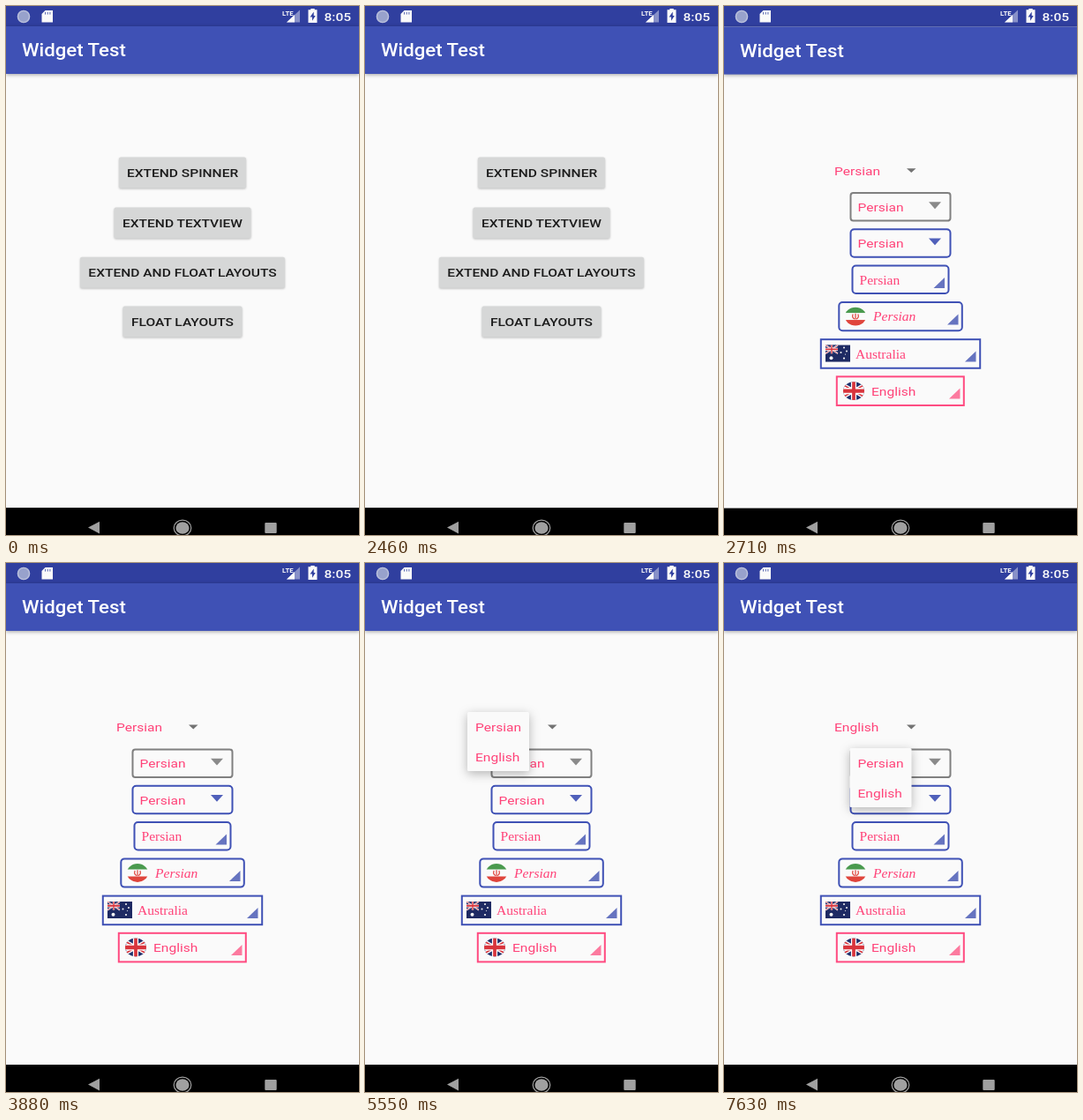
An HTML page for the animation above (8 s loop, 400 by 600 pixels).

```html
<!DOCTYPE html>
<html lang="en">
<head>
<meta charset="utf-8">
<title>Widget Test</title>
<style>
  html, body { margin: 0; width: 100%; height: 100%; overflow: hidden; background: #000; }
  svg { display: block; width: 400px; height: 600px; }
  text { font: 14px Roboto, sans-serif; fill: #ff4278; }
  .title { font: 500 20px Roboto, sans-serif; fill: #fff; }
  .label { font-weight: 500; fill: #1c1c1c; }
  .clock { font-weight: 500; fill: #fafafa; }
  .lte { font: 700 7px Roboto, sans-serif; fill: #fafafa; }
  .serif { font-family: "Liberation Serif", serif; }
  .italic { font-style: italic; }
  .mid { text-anchor: middle; }
  .button { fill: #d6d7d7; filter: drop-shadow(0 1px 1px rgba(0, 0, 0, .24)); }
  .bar { filter: drop-shadow(0 1px 2px rgba(0, 0, 0, .35)); }
  .card { fill: #fafafa; filter: drop-shadow(0 3px 6px rgba(0, 0, 0, .28)); }
</style>
</head>
<body>
<svg id="stage" viewBox="0 0 400 600"></svg>
<script>
const PAPER = '#fafafa', STATUS = '#303f9f', BLUE = '#3f51b5', GRAY = '#808080',
  PINK = '#ff4a80', NAV = '#a0a0a0', TIP = '#6674c0';

const rect = (x, y, w, h, fill, more = '') =>
  `<rect x="${x}" y="${y}" width="${w}" height="${h}" fill="${fill}" ${more}/>`;
const path = (d, fill, more = '') => `<path d="${d}" fill="${fill}" ${more}/>`;
// The 360dp wide screen is shown with unequal horizontal and vertical scale.
const text = (x, y, s, cls = '', more = '') =>
  `<text transform="translate(${x} ${y}) scale(1.111 .97)" class="${cls}" ${more}>${s}</text>`;
const group = (id, body, more = '') => `<g id="${id}" ${more}>${body}</g>`;

const frame = rect(0, 0, 400, 23, STATUS) + rect(0, 23, 400, 546, PAPER) +
  rect(0, 23, 400, 54, BLUE, 'class="bar"') + text(18, 57, 'Widget Test', 'title');

const button = (label, cy, w) =>
  rect(200 - w / 2, cy - 17.5, w, 35, '', 'rx="2" class="button"');
const buttons = [['EXTEND SPINNER', 189, 144], ['EXTEND TEXTVIEW', 246, 155],
  ['EXTEND AND FLOAT LAYOUTS', 302.2, 232], ['FLOAT LAYOUTS', 358, 135]];
const menu = frame +
  group('lift', rect(128, 171.5, 144, 35, '#d6d7d7',
    'rx="2" style="filter:drop-shadow(0 2px 4px rgba(0,0,0,.32))"')) +
  buttons.map(b => button(...b)).join('') +
  group('press', rect(128, 171.5, 144, 35, 'rgba(0,0,0,.05)', 'rx="2"') +
    '<circle id="ripple" cx="188" cy="188" fill="rgba(0,0,0,.05)"/>', 'clip-path="url(#firstButton)"') +
  buttons.map(([s, y]) => text(200, y + 5, s, 'label mid')).join('');

const box = (x, y, w, h, color, r = 0) =>
  rect(x, y, w, h, 'none', `rx="${r}" stroke="${color}" stroke-width="2"`);
const caret = (x, y, w, h, color) => path(`M${x} ${y}h${w}l${-w / 2} ${h}z`, color);
const corner = (x, y, color) => path(`M${x} ${y}v-12l-12.5 12z`, color);

// Union flag centred on the origin, 60 by 30 units.
const union = rect(-30, -15, 60, 30, '#21316d') +
  path('M-30-15L30 15M30-15L-30 15', 'none', 'stroke="#fff" stroke-width="6"') +
  path('M-30-15L30 15M30-15L-30 15', 'none', 'stroke="#d8343c" stroke-width="2.4"') +
  path('M0-15V15M-30 0H30', 'none', 'stroke="#fff" stroke-width="10"') +
  path('M0-15V15M-30 0H30', 'none', 'stroke="#d8343c" stroke-width="6"');

const iran = `<g clip-path="url(#round)" transform="translate(149 351.5)">` +
  rect(-12, -11, 24, 22, '#fafafa') + rect(-12, -11, 24, 7, '#4a9a4e') + rect(-12, 4, 24, 7, '#e0453c') +
  path('M-2.8-2.6Q-4.5 1-1 3M2.8-2.6Q4.5 1 1 3M0-3.2V3.4', 'none', 'stroke="#e0453c" stroke-width="1.2"') + '</g>';
const uk = `<g clip-path="url(#round)" transform="translate(147 436)">` +
  `<g transform="scale(.62 .72)">${union}</g></g>`;
const stars = [[121.5, 398.8, 2], [136, 387, 1], [132.5, 392.5, 1], [139, 391, 1], [136, 399, 1.1], [137.5, 394.5, .6]];
const australia = rect(115, 384, 28, 19, '#1e2a63') +
  `<g transform="translate(122 388.8) scale(.233 .32)">${union}</g>` +
  stars.map(([x, y, r]) => `<circle cx="${x}" cy="${y}" r="${r}" fill="#f4f4f4"/>`).join('');

const spinners = frame +
  text(125, 191.3, 'Persian', '', 'id="choice"') + caret(207, 183.6, 10.5, 4.8, '#737373') +
  box(143.5, 211.5, 113, 31.5, GRAY, 3) + text(151.5, 232.4, 'Persian') + caret(232, 221.8, 14, 7.8, '#8a8a8a') +
  box(143.5, 252.7, 113, 31.5, BLUE, 4) + text(151.5, 273.6, 'Persian') + caret(232, 263, 14, 7.8, '#5060ba') +
  box(145.5, 294, 109, 31.5, BLUE, 4) + text(153.5, 315, 'Persian', 'serif') + corner(250, 319.5, TIP) +
  box(130.3, 335.4, 139.5, 32.2, BLUE, 4) + iran + text(169, 356.5, 'Persian', 'serif italic') + corner(265.5, 361, TIP) +
  box(109.8, 377.6, 180.4, 32.6, BLUE) + australia + text(149, 399, 'Australia', 'serif') + corner(285.5, 403, TIP) +
  box(127.8, 419.8, 144, 32.6, PINK) + uk + text(167, 441.2, 'English') + corner(267.5, 445, '#fc7a9f');

const popup = (id, x, y) => group(id,
  rect(0, 0, 70, 67, '', 'rx="1.5" class="card"') +
  rect(0, 34, 70, 33, 'rgba(0,0,0,.12)', 'class="tap"') +
  text(9, 22.3, 'Persian') + text(9, 55.5, 'English'), `transform="translate(${x} ${y})"`);

const systemIcons =
  '<circle cx="20" cy="12" r="6.6" fill="#98a2cc" stroke="#bcc2dc" stroke-width="1.4"/>' +
  path('M44.5 5H53V18.5H40.5V9z', '#fafafa') +
  path('M44.5 7v2.6M47.2 7v2.6M49.9 7v2.6', 'none', 'stroke="#5866b0" stroke-width="1"') +
  text(313, 11, 'LTE', 'lte') +
  path('M318 18.5L333 4.5V18.5z', '#8790c8') + path('M318 18.5L327 10V18.5z', '#fafafa') +
  path('M345.3 4.2V2.9h4.4v1.3H352.5V19H342.5V4.2z', '#fafafa') +
  path('M348.7 6.5L344.6 12.4H347V16.8L350.7 10.9H348.7z', STATUS) +
  text(360.5, 17, '8:05', 'clock') +
  path('M106 584.8V598.4L93 591.6z', NAV) +
  `<ellipse cx="200" cy="592" rx="7.6" ry="6.8" fill="${NAV}"/>` +
  `<ellipse cx="200" cy="592" rx="9.8" ry="8.8" fill="none" stroke="${NAV}" stroke-width="1.2"/>` +
  rect(293.3, 586, 13.4, 12, NAV, 'rx="1"');

const $ = id => document.getElementById(id);
$('stage').innerHTML =
  '<clipPath id="firstButton"><rect x="128" y="171.5" width="144" height="35" rx="2"/></clipPath>' +
  '<clipPath id="round"><ellipse rx="12" ry="10.4"/></clipPath>' +
  rect(0, 0, 400, 600, '#000') + group('menu', menu) +
  group('page', spinners) + popup('popup1', 116, 169) + popup('popup2', 142.5, 210) + systemIcons;

const ramp = (t, from, to) => Math.min(1, Math.max(0, (t - from) / (to - from)));
const easeOut = (p, n) => 1 - (1 - p) ** n;
const fade = (node, a) => node.setAttribute('opacity', a);

function showPopup(id, t, open, close) {
  const p = easeOut(ramp(t, open, open + 280), 3), node = $(id);
  fade(node, ramp(t, open, open + 100) * (1 - ramp(t, close, close + 180)));
  node.querySelector('.card').setAttribute('height', 34 + 33 * p);
  fade(node.lastChild, p);
  fade(node.querySelector('.tap'), ramp(t, close - 230, close - 90));
}

function draw(now) {
  const t = now % 8000;

  const held = ramp(t, 1210, 1330) * (1 - ramp(t, 2050, 2350));
  fade($('lift'), held);
  fade($('press'), held);
  $('ripple').setAttribute('r', 10 + .13 * Math.max(0, t - 1210));

  const dy = 48 * (1 - easeOut(ramp(t, 2505, 2855), 5));
  fade($('page'), easeOut(ramp(t, 2505, 2705), 4));
  $('page').setAttribute('transform', `translate(0 ${dy})`);

  $('choice').textContent = t < 6430 ? 'Persian' : 'English';
  showPopup('popup1', t, 4150, 6430);
  showPopup('popup2', t, 7300, 9000);
  requestAnimationFrame(draw);
}
draw(performance.now());
</script>
</body>
</html>
```
